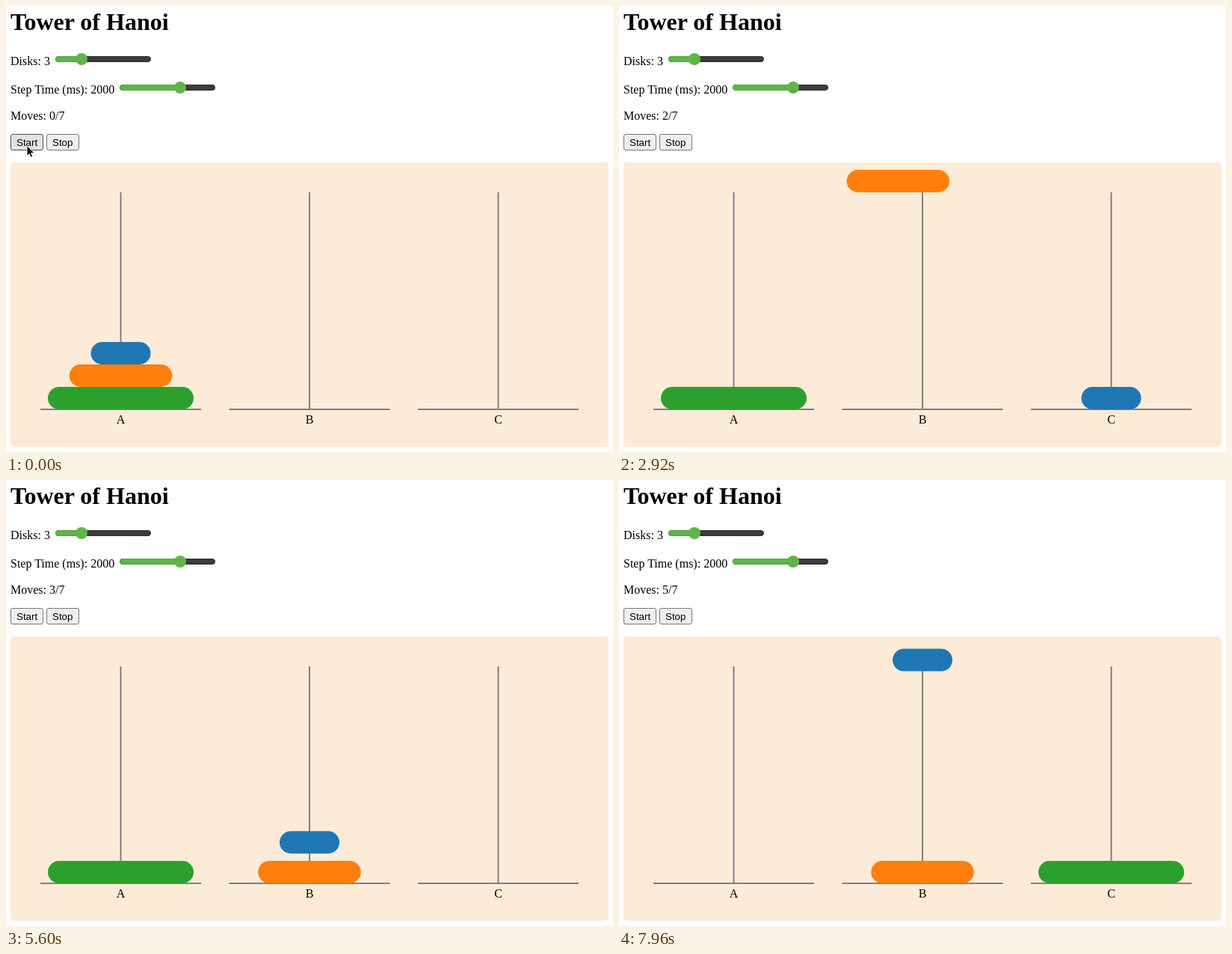
Animation of 812x596 px, one loop 8 s. Source, as an HTML page:

```html
<!DOCTYPE html>
<html lang="en">
<head>
<meta charset="utf-8">
<title>Tower of Hanoi</title>
<style>
html, body { margin: 0; width: 100%; height: 100%; overflow: hidden; background: #fff; }
svg { display: block; width: 812px; height: 596px; }
text { font: 16px "Liberation Serif", Times, serif; }
.title { font-size: 32px; font-weight: bold; }
.button text { font: 13.333px "Liberation Sans", Arial, sans-serif; }
.button rect { fill: #efefef; stroke: #767676; }
#start.hover rect { fill: #e3e3e3; stroke: #4f4f4f; }
.pole { stroke: #808080; stroke-width: 2; }
</style>
</head>
<body>
<svg id="stage" viewBox="0 0 812 596">
  <text class="title" x="6" y="32">Tower of Hanoi</text>
  <text x="6" y="79">Disks: 3</text>
  <text x="6" y="117">Step Time (ms): 2000</text>
  <text x="6" y="152" id="moves">Moves: 0/7</text>
  <g id="sliders"></g>
  <g class="button" id="start">
    <rect x="6.5" y="171.5" width="43" height="21" rx="2.5"/>
    <text x="14" y="187">Start</text>
  </g>
  <g class="button">
    <rect x="54.5" y="171.5" width="43" height="21" rx="2.5"/>
    <text x="62" y="187">Stop</text>
  </g>
  <rect x="6" y="209" width="800" height="380" rx="5" fill="#fcebd7"/>
  <g id="pegs"></g>
  <g id="disks"></g>
  <path id="cursor" d="M28 186.500V200.500L31.200 197.500L33.300 202.300L35.700 201.300L33.600 196.600H38Z"
        fill="#000" stroke="#fff" stroke-width="1"/>
</svg>
<script>
const LOOP = 8000, FIRST = 113, STEP = 1840, PHASE = 613, DROP = 770;
const PEG_X = [153.5, 406, 658.5];
const HEIGHT = 30, TOP = 219, FLOOR = 509;
const DISKS = [
  { width: 80, color: "#1f77b4" },
  { width: 137.5, color: "#ff7f0e" },
  { width: 195, color: "#2ca02c" }
];

const $ = id => document.getElementById(id);

function add(parent, tag, attrs, text) {
  const el = document.createElementNS("http://www.w3.org/2000/svg", tag);
  for (const key in attrs) el.setAttribute(key, attrs[key]);
  if (text) el.textContent = text;
  return parent.appendChild(el);
}

function addSlider(x, y, thumb) {
  const g = $("sliders");
  add(g, "rect", { x: x + .5, y: y - 3.5, width: 127, height: 7, rx: 3.5, fill: "#3b3b3b", stroke: "#303030" });
  add(g, "rect", { x: x + .5, y: y - 3.5, width: thumb - x, height: 7, rx: 3.5, fill: "#5fb548", stroke: "#55a341" });
  add(g, "circle", { cx: thumb, cy: y, r: 8, fill: "#5fb548" });
}

addSlider(66, 71, 101);
addSlider(152, 109, 233);

PEG_X.forEach((x, i) => {
  const g = $("pegs");
  add(g, "line", { class: "pole", x1: x, x2: x, y1: 249, y2: 539 });
  add(g, "line", { class: "pole", x1: x - 107.5, x2: x + 107.5, y1: 539, y2: 539 });
  add(g, "text", { x, y: 558, "text-anchor": "middle" }, "ABC"[i]);
});

for (const d of DISKS) {
  d.el = add($("disks"), "rect", { width: d.width, height: HEIGHT, rx: 15, fill: d.color });
}

// Play the puzzle once to learn every move's start and end slot.
function solve() {
  const pegs = [[2, 1, 0], [], []], moves = [];
  const slot = peg => FLOOR - HEIGHT * pegs[peg].length;
  (function shift(n, from, to, spare) {
    if (!n) return;
    shift(n - 1, from, spare, to);
    const disk = pegs[from].pop();
    moves.push({ disk, x0: PEG_X[from], x1: PEG_X[to], y0: slot(from), y1: slot(to) });
    pegs[to].push(disk);
    shift(n - 1, spare, to, from);
  })(3, 0, 2, 1);
  return moves;
}
const MOVES = solve();

// cubic-bezier(.25, .1, .25, 1)
function ease(t) {
  if (t <= 0) return 0;
  if (t >= 1) return 1;
  const curve = (a, b, s) => 3 * a * s * (1 - s) ** 2 + 3 * b * s * s * (1 - s) + s ** 3;
  let lo = 0, hi = 1;
  for (let i = 0; i < 24; i++) {
    const mid = (lo + hi) / 2;
    if (curve(.25, .25, mid) < t) lo = mid; else hi = mid;
  }
  return curve(.1, 1, lo);
}

function draw(time) {
  const pos = DISKS.map((_, i) => ({ x: PEG_X[0], y: FLOOR - HEIGHT * (2 - i) }));
  let count = 0;
  MOVES.forEach((m, i) => {
    const t = time - FIRST - i * STEP;
    if (t < 0) return;
    count++;
    const up = ease(t / PHASE);
    const across = ease((t - PHASE) / PHASE);
    const down = ease((t - 2 * PHASE) / DROP);
    pos[m.disk] = {
      x: m.x0 + (m.x1 - m.x0) * across,
      y: m.y0 + (TOP - m.y0) * up + (m.y1 - TOP) * down
    };
  });
  DISKS.forEach((d, i) => {
    d.el.setAttribute("x", pos[i].x - d.width / 2);
    d.el.setAttribute("y", pos[i].y);
  });
  $("moves").textContent = `Moves: ${count}/7`;
  $("start").classList.toggle("hover", !count);
  $("cursor").style.display = count ? "none" : "";
}

const began = performance.now();
function tick() {
  draw((performance.now() - began) % LOOP);
  requestAnimationFrame(tick);
}
tick();
</script>
</body>
</html>
```
